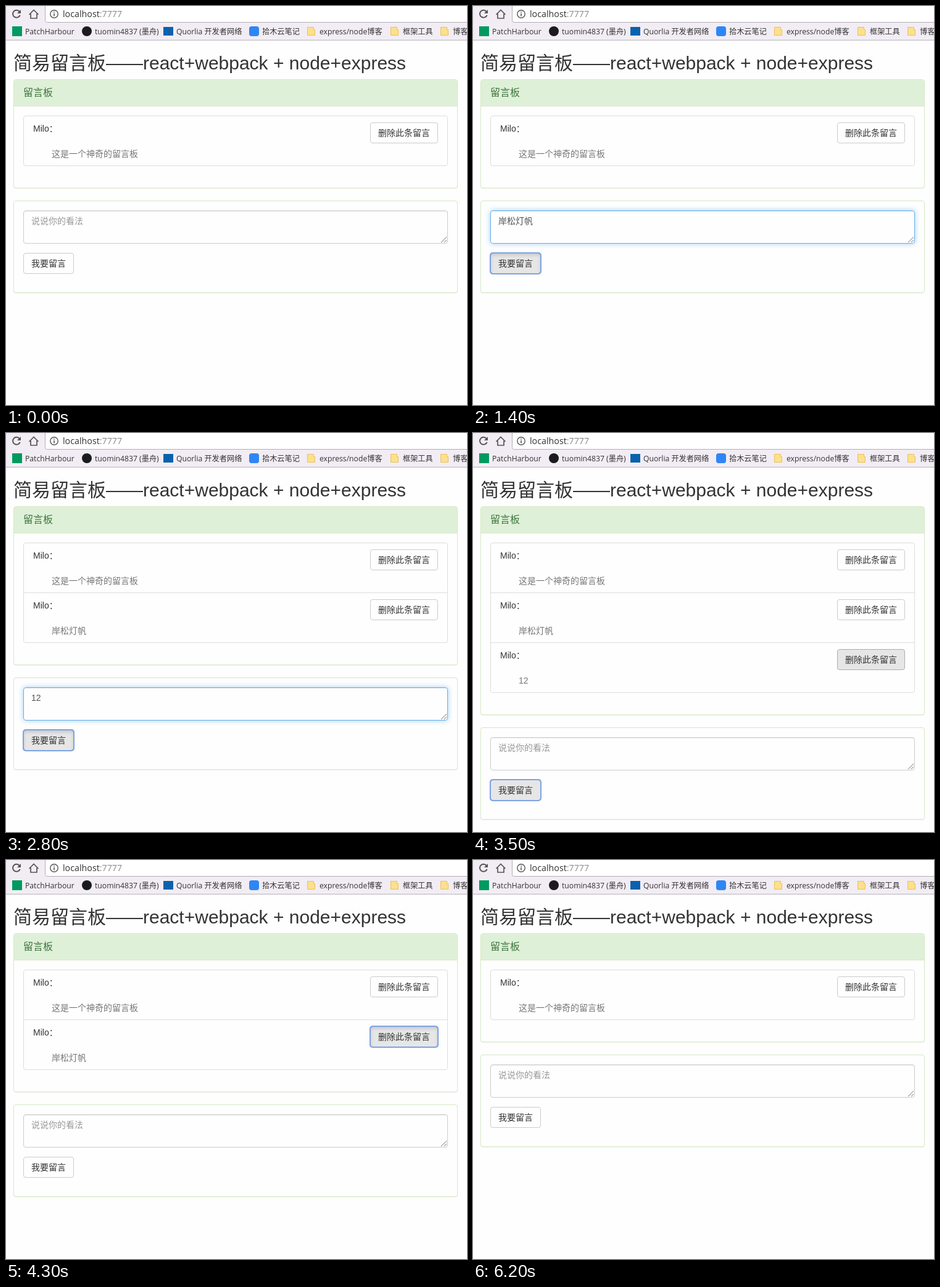
An HTML page that plays this animation: 747x648 px, repeating every 6700 ms.

```html
<!DOCTYPE html>
<html lang="zh-CN">
<head>
<meta charset="utf-8">
<title>简易留言板</title>
<style>
* { box-sizing: border-box; }
html, body { margin: 0; width: 100%; height: 100%; overflow: hidden; background: #fefefe; }
body { font: 14px/20px "Liberation Sans", "Noto Sans CJK SC", "Noto Sans CJK", sans-serif; color: #333; }
#stage { position: relative; width: 747px; height: 648px; overflow: hidden; }
#chrome { position: absolute; left: 0; top: 0; font-family: "Open Sans", "Noto Sans CJK SC", "Noto Sans CJK", sans-serif; }
#page { position: absolute; left: 12px; top: 76px; width: 720px; }
h1 { margin: 0 0 10px; height: 33px; font-size: 30px; line-height: 33px; font-weight: 300; white-space: nowrap; }

.panel { margin-bottom: 20px; border: 1px solid #d6e9c6; border-radius: 4px; background: #fefefe; box-shadow: 0 1px 1px rgba(0,0,0,.05); }
.panel h2 { margin: 0; height: 43px; padding: 0 15px; border-bottom: 1px solid #d6e9c6; border-radius: 3px 3px 0 0;
  background: #dff0d8; color: #3c763d; font-size: 16px; line-height: 41px; font-weight: 400; }
.body { padding: 15px; }
#list { margin-bottom: 20px; border: 1px solid #ddd; border-radius: 4px; }
.item { position: relative; height: 80px; padding: 10px 15px; }
.item + .item { height: 81px; border-top: 1px solid #ddd; }
.item p { position: absolute; left: 45px; top: 51px; margin: 0; color: #777; }
.item .btn { position: absolute; right: 15px; top: 10px; }

.btn { display: block; width: max-content; height: 34px; padding: 6px 12px; border: 1px solid #ccc; border-radius: 4px; background: #fefefe; white-space: nowrap; }
.hover { background: #e6e6e6; border-color: #adadad; }
.on, .press { background: #e6e6e6; border-color: #8c8c8c; outline: 2px solid #7fa3e2; outline-offset: -1px; }
.press { box-shadow: inset 0 3px 5px rgba(0,0,0,.125); }

#field { position: relative; height: 54px; margin-bottom: 15px; padding: 6px 12px; border: 1px solid #ccc; border-radius: 4px;
  color: #555; box-shadow: inset 0 1px 1px rgba(0,0,0,.075); }
#field.dim { border-color: #9dbdd6; box-shadow: inset 0 1px 1px rgba(0,0,0,.075), 0 0 3px rgba(102,175,233,.25); }
#field.focus { border-color: #66afe9; box-shadow: inset 0 1px 1px rgba(0,0,0,.075), 0 0 8px rgba(102,175,233,.6); }
#field svg { position: absolute; right: 1px; bottom: 1px; }
#typed.compose { text-decoration: underline; text-underline-offset: 2px; }
#hint { color: #999; }
#caret { display: inline-block; width: 1px; height: 16px; margin-right: -1px; vertical-align: -3px; background: #222; }
#send { margin-bottom: 15px; }

#ime { position: absolute; top: 360px; height: 44px; display: flex; border: 1px solid #0f6fb8; background: #fff;
  color: #000; font-size: 17.3px; line-height: 44px; white-space: nowrap; }
#ime span { padding: 0 16px; }
#ime i { display: inline-block; width: 10px; font-size: 12px; font-style: normal; color: #777; }
#ime span:first-child { background: #0078d7; }
#ime span:first-child, #ime span:first-child i { color: #fff; }
#ime svg { width: 44px; height: 42px; border-left: 1px solid #0f6fb8; }
[hidden] { display: none !important; }
</style>
</head>
<body>
<div id="stage">
  <svg id="chrome" width="747" height="56" font-size="12.2" fill="#333">
    <rect width="747" height="56" fill="#f2edf4"/>
    <path d="M0 55.5H747" stroke="#b7b3b8"/>
    <rect x="63.5" y="-8" width="720" height="34.5" rx="3" fill="#fff" stroke="#b3aeb4"/>
    <rect id="mark" y="29" height="24" rx="2" fill-opacity=".07"/>
    <g fill="none" stroke="#555" stroke-width="2">
      <g id="reload"><path d="M21.7 9A6 6 0 1 0 22.7 14.8"/><path d="M24 6v6h-6z" fill="#555" stroke="none"/></g>
      <path id="stop" d="M12 8l10 10M22 8L12 18"/>
      <path d="M37.5 14L45 6.5L52.5 14M40 12.5V20H50V12.5" stroke-width="1.7"/>
      <circle cx="78" cy="13" r="6.2" stroke-width="1.4"/>
      <path d="M78 12v4.5M78 9.2v1.6" stroke-width="1.6"/>
    </g>
    <text x="92" y="18" font-size="14.25">localhost<tspan fill="#888">:7777</tspan></text>
    <rect x="10" y="33" width="16" height="16" fill="#009a61"/>
    <circle cx="131" cy="41" r="8" fill="#1b1b1d"/>
    <rect x="255" y="34" width="16" height="14" fill="#0a62ad"/>
    <rect x="394" y="33" width="16" height="16" rx="4" fill="#2e86f5"/>
    <g id="folders" fill="#fde08d" stroke="#e9c25c"></g>
    <g id="labels"></g>
  </svg>

  <div id="page">
    <h1>简易留言板——react+webpack + node+express</h1>
    <div class="panel">
      <h2>留言板</h2>
      <div class="body"><div id="list"></div></div>
    </div>
    <div class="panel">
      <div class="body" style="padding-bottom:0.01px">
        <div id="field"><span id="typed"></span><span id="caret"></span><span id="hint">说说你的看法</span>
          <svg width="9" height="9" stroke="#777"><path d="M0 9L9 0M5 9L9 5"/></svg>
        </div>
        <div id="send" class="btn">我要留言</div>
        <div style="height:15px"></div>
      </div>
    </div>
  </div>

  <div id="ime"></div>
</div>
<script>
const LOOP = 6700;
const $ = id => document.getElementById(id);
const messages = ["这是一个神奇的留言板", "岸松灯帆", "12"];
const short = { x: 45, words: "啊 阿 吖 嗄 呵 锕 腌" };
const long = { x: 66, words: "岸松灯 岸上灯 暗色调 岸松 哀思 按时 暗示" };

// Each scene holds until the next one; omitted keys fall back to the resting state.
const rest = { items: 1, text: "", field: "", send: "", del: "", ime: null, mark: null, stop: false };
const scenes = [
  [0, {}],
  [700, { field: "focus" }],
  [800, { field: "focus", text: "a", ime: short }],
  [900, { field: "focus", text: "a's'd", ime: long }],
  [1000, { field: "focus", text: messages[1] }],
  [1200, { field: "focus", text: messages[1], send: "hover" }],
  [1400, { field: "focus", text: messages[1], send: "press" }],
  [1500, { items: 2, field: "dim", send: "on" }],
  [1600, { items: 2, send: "on" }],
  [2200, { items: 2, field: "dim" }],
  [2300, { items: 2, field: "focus" }],
  [2400, { items: 2, field: "focus", text: "1" }],
  [2500, { items: 2, field: "focus", text: "12" }],
  [2800, { items: 2, field: "focus", text: "12", send: "press" }],
  [2900, { items: 3, send: "on" }],
  [3500, { items: 3, send: "on", del: "hover" }],
  [3700, { items: 3, del: "press" }],
  [3800, { items: 2 }],
  [4000, { items: 2, del: "hover" }],
  [4300, { items: 2, del: "press" }],
  [4400, {}],
  [4600, { mark: [118, 124] }],
  [4700, { mark: [4, 113] }],
  [4900, {}],
  [5100, { stop: true }],
  [5800, {}]
];

$("list").innerHTML = messages.map(m =>
  `<div class="item">Milo：<p>${m}</p><div class="btn">删除此条留言</div></div>`).join("");
$("folders").innerHTML = [488, 623, 704].map(x =>
  `<path d="M${x + .5} 34.5h10v4h2v9h-12z"/>`).join("");
$("labels").innerHTML = [
  [31, "PatchHarbour"], [144, "tuomin4837 (墨舟)"], [276, "Quorlia 开发者网络"], [415, "拾木云笔记"],
  [508, "express/node博客"], [643, "框架工具"], [724, "博客"]
].map(([x, label]) => `<text x="${x}" y="46">${label}</text>`).join("");

const items = [...document.querySelectorAll(".item")];
const smiley = `<svg viewBox="0 0 44 42" fill="none" stroke="#111" stroke-width="1.4">
  <circle cx="21.5" cy="21" r="8"/><path d="M17 23.5q4.5 5 9 0M18.5 17.5v2M24.5 17.5v2"/></svg>`;

function show(s) {
  items.forEach((el, i) => {
    el.hidden = i >= s.items;
    el.lastElementChild.className = "btn " + (i === s.items - 1 ? s.del : "");
  });
  $("field").setAttribute("class", s.field);
  $("send").className = "btn " + s.send;
  $("typed").textContent = s.text;
  $("typed").className = s.ime ? "compose" : "";
  $("hint").hidden = s.text !== "";
  $("caret").hidden = !s.field || s.send !== "";
  $("ime").hidden = !s.ime;
  if (s.ime) {
    $("ime").style.left = s.ime.x + "px";
    $("ime").innerHTML = s.ime.words.split(" ").map((w, i) => `<span><i>${i + 1}</i>${w}</span>`).join("") + smiley;
  }
  const [x, width] = s.mark || [0, 0];
  $("mark").setAttribute("x", x);
  $("mark").setAttribute("width", width);
  $("reload").style.display = s.stop ? "none" : "";
  $("stop").style.display = s.stop ? "" : "none";
}

const start = performance.now();
let current;
function tick() {
  const t = (performance.now() - start) % LOOP;
  const scene = scenes.findLast(([from]) => from <= t);
  if (scene !== current) show({ ...rest, ...scene[1] });
  current = scene;
  requestAnimationFrame(tick);
}
tick();
</script>
</body>
</html>
```
